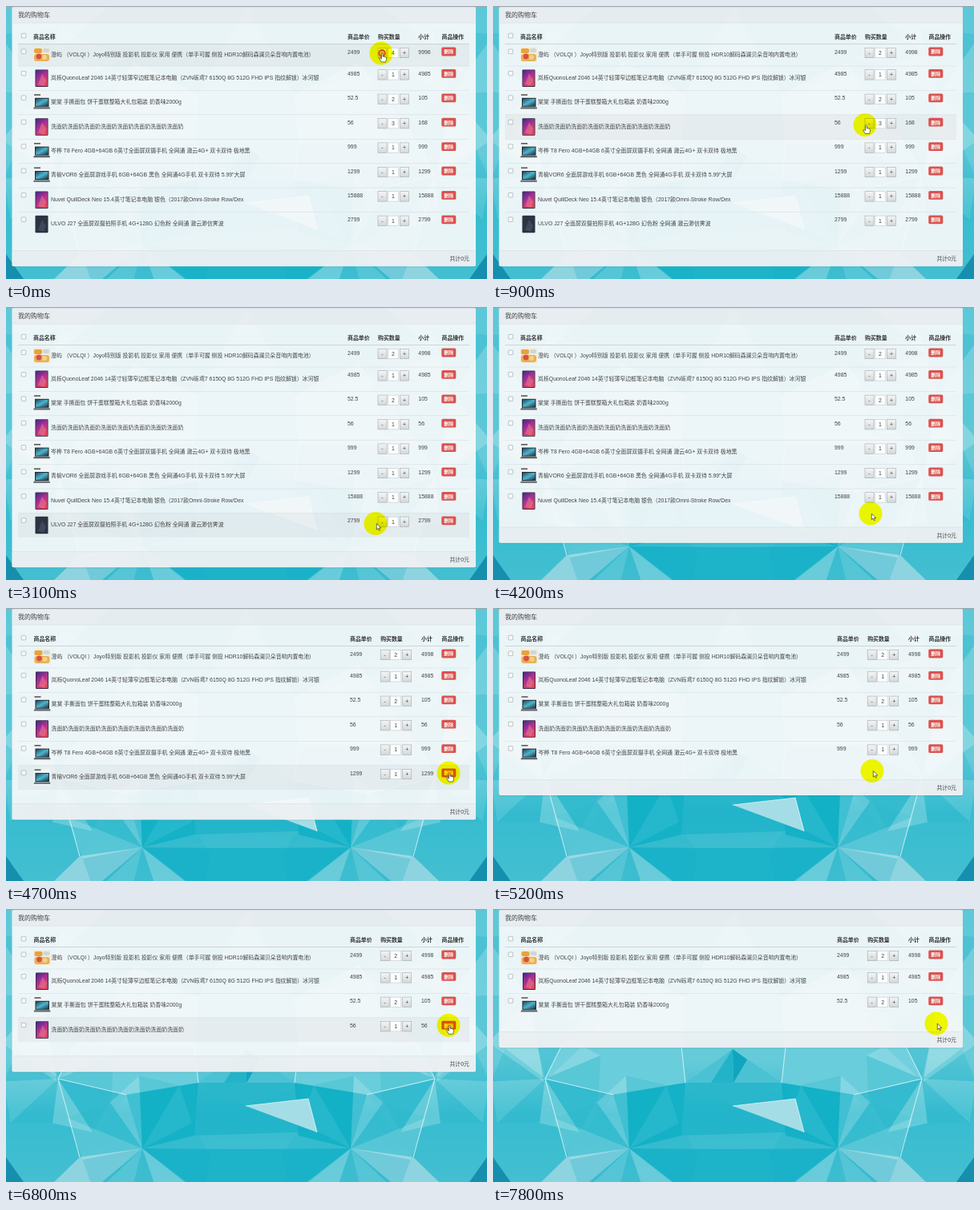
Recreate the animation shown at these times as an HTML page. Size 600x341 px, loop 8 s.

```html
<!DOCTYPE html>
<html lang="zh-CN">
<head>
<meta charset="utf-8">
<title>我的购物车</title>
<style>
html, body { margin: 0; width: 100%; height: 100%; overflow: hidden; background: #3fbfd1; }
svg { display: block; width: 100vw; height: 100vh; }
text { font: 6.9px 'Liberation Sans', 'Noto Sans CJK SC', 'Noto Sans CJK', sans-serif; fill: #444; }
.head { font-weight: 700; fill: #333; }
.mid { text-anchor: middle; }
.end { text-anchor: end; }
.title { font-size: 8px; }
.del { fill: #fff; font-size: 6px; font-weight: 700; text-anchor: middle; }
.spot { mix-blend-mode: multiply; fill: #ff0; }
.edge { fill: none; stroke: #dcf5f8; stroke-width: 1.1; opacity: .8; }
</style>
</head>
<body>
<svg viewBox="0 0 600 341" preserveAspectRatio="none">
  <defs>
    <linearGradient id="sky" x2="0" y2="1"><stop stop-color="#5cc8d7"/><stop offset=".55" stop-color="#66cbd9"/><stop offset=".75" stop-color="#37bcd0"/><stop offset="1" stop-color="#43bfd1"/></linearGradient>
    <linearGradient id="btn" x2="0" y2="1"><stop stop-color="#f4f5f5"/><stop offset="1" stop-color="#d3d8da"/></linearGradient>
    <linearGradient id="phone" x2=".6" y2="1"><stop stop-color="#43298c"/><stop offset=".5" stop-color="#a92f92"/><stop offset="1" stop-color="#e2475f"/></linearGradient>
    <linearGradient id="screen" x2="1" y2="1"><stop stop-color="#1f4a62"/><stop offset=".5" stop-color="#4fb4cc"/><stop offset="1" stop-color="#1b3546"/></linearGradient>
    <g id="half"></g>
  </defs>
  <rect width="600" height="341" fill="url(#sky)"/>
  <use href="#half"/>
  <use href="#half" transform="translate(600) scale(-1 1)"/>
  <g id="centre"></g>
  <g id="scene"></g>
</svg>
<script>
const LOOP = 8000, STEP = 100;
const byId = id => document.getElementById(id);
const facet = (points, fill, opacity = 1) => `<polygon points="${points}" fill="${fill}" opacity="${opacity}"/>`;
const edge = d => `<path class="edge" d="${d}"/>`;
const rect = (x, y, w, h, fill, more = '') =>
  `<rect x="${x}" y="${y}" width="${w}" height="${h}" fill="${fill}" ${more}/>`;
const label = (x, y, str, cls = '') => `<text x="${x}" y="${y + 2.5}" class="${cls}">${str}</text>`;

// Translucent triangles around a hub, alternately lighter and darker.
function fan(cx, cy, radius, blades, turn) {
  const tip = k => {
    const a = turn + k * 2 * Math.PI / blades, r = radius * (1 + .2 * Math.sin(k * 2.4));
    return `${cx + r * Math.cos(a)},${cy + r * Math.sin(a)}`;
  };
  return Array.from({ length: blades }, (_, k) =>
    facet(`${cx},${cy} ${tip(k)} ${tip((k + 1) % blades)}`, k % 2 ? '#e4f5f7' : '#12adc4', .16 + .08 * Math.sin(k * 1.9))).join('');
}

// Faceted backdrop, left half; the right half mirrors it.
byId('half').innerHTML =
  facet('130,0 300,0 240,110 60,60', '#1fadc4', .5) +
  facet('160,70 240,110 236,172 85,172', '#d6eef2', .45) +
  facet('85,172 236,172 240,217 150,232 65,212', '#6acddb') +
  facet('65,212 150,232 92,310', '#3cbdd0') +
  facet('150,232 240,217 235,283 170,299', '#14b1c7') +
  facet('92,310 170,299 120,341 60,341', '#8ed4e0') +
  facet('170,299 300,300 300,341 225,341', '#1db3c9') +
  fan(65, 212, 70, 9, .3) + fan(170, 299, 85, 11, .1) + fan(45, 110, 95, 7, .5) +
  facet('0,310 22,341 0,341', '#168fae') +
  edge('M85 172 65 212 92 310M65 212 150 232M235 172 240 217H300');

byId('centre').innerHTML =
  facet('240,217 299,175 360,217 300,245', '#4ac2d3') +
  facet('299,175 317,188 300,217', '#10a5be') +
  facet('299,175 300,217 272,217', '#23b3c9') +
  facet('240,217 360,217 388,278 235,283', '#12b0c6', .55) +
  facet('299,246 377,237 388,279', '#a5dde6') +
  edge('M299 246 377 237 388 279');

const rows = [
  { name: '澄屿 （VOLQI ）Joyo特别版 投影机 投影仪 家用 便携（单手可握 侧投 HDR10解码森澜贝朵音响内置电池）', price: 2499, qty: 4, pic: 'box' },
  { name: '岚栎QuonoLeaf 2046 14英寸轻薄窄边框笔记本电脑（ZVN砾鸢7 6150Q 8G 512G FHD IPS 指纹解锁）冰河银', price: 4985, qty: 1, pic: 'phone' },
  { name: '棠棠 手撕面包 饼干蛋糕整箱大礼包箱装 奶香味2000g', price: 52.5, qty: 2, pic: 'laptop' },
  { name: '洗面奶'.repeat(8), price: 56, qty: 3, pic: 'phone' },
  { name: '岑桦 T8 Fero 4GB+64GB 6英寸全面屏双摄手机 全网通 澈云4G+ 双卡双待 极地黑', price: 999, qty: 1, pic: 'laptop' },
  { name: '青榆VOR6 全面屏游戏手机 6GB+64GB 黑色 全网通4G手机 双卡双待 5.99"大屏', price: 1299, qty: 1, pic: 'laptop' },
  { name: 'Nuvel QuillDeck Neo 15.4英寸笔记本电脑 银色（2017款Omni-Stroke Row/Dex', price: 15888, qty: 1, pic: 'phone' },
  { name: 'ULVO J27 全面屏双摄拍照手机 4G+128G 幻色粉 全网通 澈云渺信霁波', price: 2799, qty: 1, pic: 'dark' }
];

const phone = (fill, shine) => rect(2.5, 0, 16, 21.5, '#2b2740', 'rx="1"') + rect(3.3, .8, 14.4, 19.9, fill) +
  `<path d="M6 18 11 5 16 13 13 20z" fill="${shine}" opacity=".45"/>`;
const thumbs = {
  box: rect(0, -.5, 21, 18.5, '#f5ead9') + rect(1, 1, 10, 6, '#e8a33c', 'rx="2"') +
    rect(12, 1, 8, 5, '#c9d8dc', 'rx="2"') + rect(1, 8, 19, 9, '#e6b158', 'rx="3"') +
    '<circle cx="7" cy="11" r="3.4" fill="#d9503f"/><circle cx="14" cy="12" r="3" fill="#f3d287"/>',
  phone: phone('url(#phone)', '#f08a9c'),
  laptop: rect(0, 0, 21, 20.5, '#f1f4f4') + rect(1, .5, 8, 1.4, '#444') +
    rect(2, 5, 17.5, 11, '#202d36') + rect(3, 6, 15.5, 9, 'url(#screen)') +
    '<path d="M1 16.5h19.5l.5 2.2H0z" fill="#59676d"/>',
  dark: phone('#2c3442', '#53647a')
};

const rowTop = i => i ? 75 + 30.4 * (i - 1) : 47.6;

// Each press lands one step before its effect.
const minuses = [[100, 0], [400, 0], [1500, 3], [1900, 3]].map(([time, row]) => ({ time, row }));
const removals = [[3400, 3600], [4400, 4500], [4700, 4900], [5500, 5700], [6700, 7700]]
  .map(([reach, time], i) => ({ reach, time, row: rows.length - 1 - i }));
const presses = [...minuses, ...removals].map(e => e.time - STEP);

// Where the pointer rests: from, to, x, y
const stops = [
  [0, 500, 468, 59], [900, 1200, 464, 148.5], [1400, 2300, 468, 148.5], [2900, 3100, 461, 270.5],
  [4200, 4200, 471, 258], [5200, 5200, 473, 203.5], [6100, 6100, 508, 181], [7800, LOOP, 553, 143],
  ...removals.map(r => [r.reach, r.time, 552, rowTop(r.row) + 9.4])
].sort((a, b) => a[0] - b[0]);

function pointerAt(t) {
  const i = stops.findIndex(s => t <= s[1]);
  const [from, , x, y] = stops[i];
  if (t >= from) return [x, y];
  const [, left, x0, y0] = stops[i - 1];
  const u = (t - left) / (from - left), e = u * u * (3 - 2 * u);
  return [x0 + (x - x0) * e, y0 + (y - y0) * e];
}

const checkbox = y => rect(19.2, y - 3, 5.6, 5.6, '#f8f9f9', 'stroke="#9aa0a2" stroke-width=".6" rx=".8"');
const button = (x, y, sign) =>
  rect(x, y - 6, 11, 12.4, 'url(#btn)', 'stroke="#a4aaad" stroke-width=".6"') + label(x + 5.5, y, sign, 'mid');

function drawRow(i, t, cols, hover) {
  const { name, price, qty, pic } = rows[i], top = rowTop(i);
  const y = top + 9.4, nameY = top + (i ? 14.3 : 12.6);
  const count = qty - minuses.filter(m => m.row === i && t >= m.time).length;
  return (hover ? rect(15, top, 563, rowTop(i + 1) - top, '#000', 'opacity=".035"') : '') +
    (i ? rect(15, top - .25, 563, .5, '#d3d8da') : '') +
    checkbox(y) +
    `<g transform="translate(${cols.name} ${top + 4.4})">${thumbs[pic]}</g>` +
    label(cols.name + 22, nameY, name) +
    label(cols.price, y, price) +
    button(cols.qty, y + 1.3, '-') +
    rect(cols.qty + 12.4, y - 4.7, 13.2, 12.4, '#fcfdfd', 'stroke="#c3c8ca" stroke-width=".6"') +
    label(cols.qty + 19, y + 1.3, count, 'mid') +
    button(cols.qty + 27.5, y + 1.3, '+') +
    label(cols.sum, y, price * count) +
    rect(543.3, y - 5.4, 18, 10.8, '#d9534f', 'rx="1.6"') +
    label(552.3, y - .2, '删除', 'del');
}

function drawPointer(x, y, hand, pressed) {
  const shape = hand
    ? 'M-.9 .9Q0-.7.9.9V4.2Q2 3.6 2.5 4.5 3.5 4 4 5 5.2 4.9 5.2 6.2V8.4L4.2 11H-1L-3.7 6.7Q-3.5 5.4-2.2 6L-.9 7.2Z'
    : 'M0 0V7.6L1.8 6 3.1 8.8 4.3 8.2 3 5.5H5.5Z';
  return `<circle class="spot" cx="${x}" cy="${y}" r="14.5"/>` +
    (pressed ? `<circle cx="${x + 1}" cy="${y}" r="4" fill="#e8402a" fill-opacity=".35" stroke="#e02a1c" stroke-width="1.3"/>` : '') +
    `<path transform="translate(${x + 1.3} ${y})" d="${shape}" fill="#fff" stroke="#222" stroke-width=".65" stroke-linejoin="round"/>`;
}

function draw(t) {
  const count = rows.length - removals.filter(r => t >= r.time).length;
  // The five-digit price keeps its columns wide until its row goes.
  const cols = count > 6
    ? { name: 34, price: 426, qty: 464, sum: 514.3 }
    : { name: 34.5, price: 429, qty: 467.2, sum: 518 };
  const foot = rowTop(count) + 17.4, bottom = foot + 20.2;
  const [x, y] = pointerAt(t);
  const hovered = rows.findIndex((_, i) => i < count && y >= rowTop(i) && y < rowTop(i + 1));
  const over = (left, width) => x > left && x < left + width;
  const hand = hovered >= 0 && Math.abs(y - rowTop(hovered) - 10.5) < 7 &&
    (over(cols.qty - 1, 12) || over(cols.qty + 27, 12) || over(543, 18));
  const heads = [[cols.name, '商品名称'], [cols.price, '商品单价'], [cols.qty, '购买数量'], [cols.sum, '小计'], [543.5, '商品操作']];

  byId('scene').innerHTML =
    rect(7.5, 1, 578.5, bottom, '#197f92', 'opacity=".2" rx="2"') +
    rect(7.5, 1, 578.5, bottom - 1.2, '#fdfcfd', 'opacity=".9" rx="2"') +
    rect(7.5, 1, 578.5, 20, '#dfe3e5', 'opacity=".45"') +
    rect(7.5, 20.8, 578.5, .5, '#d3d9db') +
    rect(7.5, foot, 578.5, 19.4, '#e2e6e8', 'opacity=".45"') +
    rect(7.5, foot, 578.5, .5, '#d5dbdd') +
    rect(0, 0, 600, 1.2, '#9fa7aa') +
    label(15, 11.5, '我的购物车', 'title') +
    checkbox(37.3) +
    heads.map(([left, str]) => label(left, 38, str, 'head')).join('') +
    rect(15, 47, 563, .9, '#cbd1d3') +
    rows.slice(0, count).map((_, i) => drawRow(i, t, cols, i === hovered)).join('') +
    label(578, foot + 10.2, '共计0元', 'end') +
    drawPointer(x, y, hand, presses.includes(t));
}

let shown = -1;
function tick(now) {
  const t = Math.floor(now % LOOP / STEP) * STEP;
  if (t !== shown) draw(shown = t);
  requestAnimationFrame(tick);
}
draw(0);
requestAnimationFrame(tick);
</script>
</body>
</html>
```
